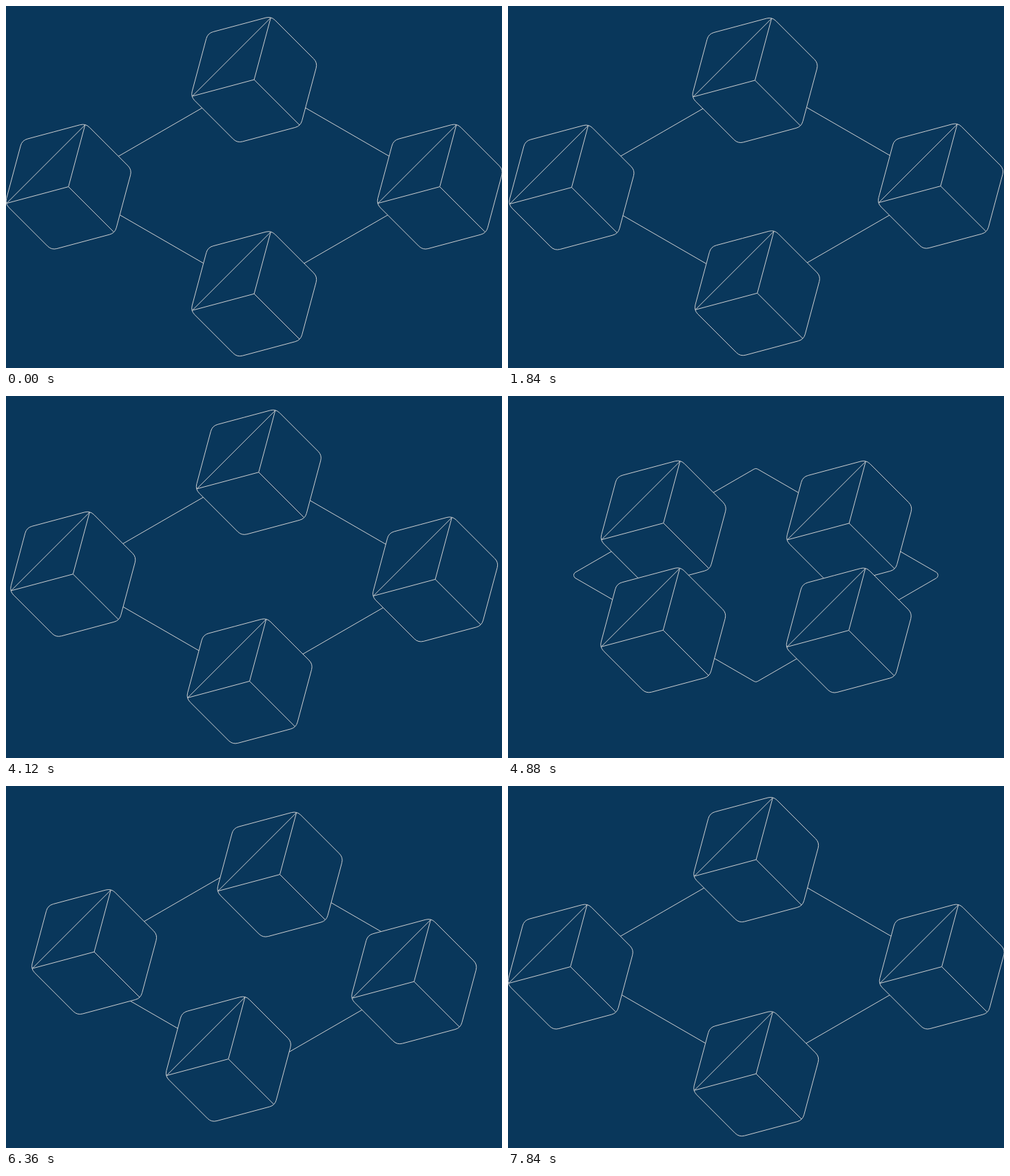
Recreate the animation shown at these times as an HTML page with a canvas. Size 720 by 526 pixels, loop 7.88 s.

```html
<!DOCTYPE html>
<html lang="en">
<head>
<meta charset="utf-8">
<title>Orbiting cubes</title>
<style>
  html, body { margin: 0; height: 100%; overflow: hidden; background: #09375b; }
  canvas { display: block; }
</style>
</head>
<body>
<canvas id="stage" width="720" height="526"></canvas>
<script>
const ctx = document.getElementById('stage').getContext('2d');
const BACK = '#09375b', LINE = '#cdcfd1';
const LOOP = 7880, MOVE = 1952;

const polar = (r, deg) => [r * Math.cos(deg * Math.PI / 180), r * Math.sin(deg * Math.PI / 180)];
const hexagon = [-75, -15, 45, 105, 165, 225].map(a => polar(95.3, a));
const [tipUp, tipRight, tipLeft] = [-75, 45, 165].map(a => polar(93, a));
const track = [[0, -155.7], [269.3, 0], [0, 155.7], [-269.3, 0]];
const stops = [[360.2, 107], [629.7, 262.6], [360.2, 418.2], [90.7, 262.6]];

// cubic-bezier(.42, 0, .58, 1)
function ease(x) {
  let lo = 0, hi = 1;
  for (let i = 0; i < 30; i++) {
    const s = (lo + hi) / 2;
    if (1.26 * s - 0.78 * s * s + 0.52 * s ** 3 < x) lo = s; else hi = s;
  }
  return lo * lo * (3 - 2 * lo);
}

function rounded(points, radius) {
  const n = points.length, a = points[n - 1], b = points[0];
  ctx.beginPath();
  ctx.moveTo((a[0] + b[0]) / 2, (a[1] + b[1]) / 2);
  points.forEach((p, i) => ctx.arcTo(...p, ...points[(i + 1) % n], radius));
  ctx.closePath();
}

function at([x, y], draw) {
  ctx.save();
  ctx.translate(x, y);
  draw();
  ctx.restore();
}

function cube() {
  rounded(hexagon, 14);
  ctx.fill();
  ctx.stroke();
  ctx.beginPath();
  ctx.moveTo(...tipRight);
  ctx.lineTo(0, 0);
  ctx.lineTo(...tipUp);
  ctx.lineTo(...tipLeft);
  ctx.lineTo(0, 0);
  ctx.stroke();
}

function frame() {
  const t = performance.now() % LOOP;
  const p = ease(t < 4 * MOVE ? t % MOVE / MOVE : 0);
  ctx.fillStyle = BACK;
  ctx.strokeStyle = LINE;
  ctx.lineWidth = 1;
  ctx.fillRect(0, 0, 720, 526);
  at([359.8, 260.4], () => { rounded(track, 5); ctx.stroke(); });
  stops
    .map(([x, y], i) => {
      const [nextX, nextY] = stops[(i + 1) % 4];
      return [x + (nextX - x) * p, y + (nextY - y) * p];
    })
    .sort((a, b) => a[1] - b[1])
    .forEach(pos => at(pos, cube));
  requestAnimationFrame(frame);
}
frame();
</script>
</body>
</html>
```
